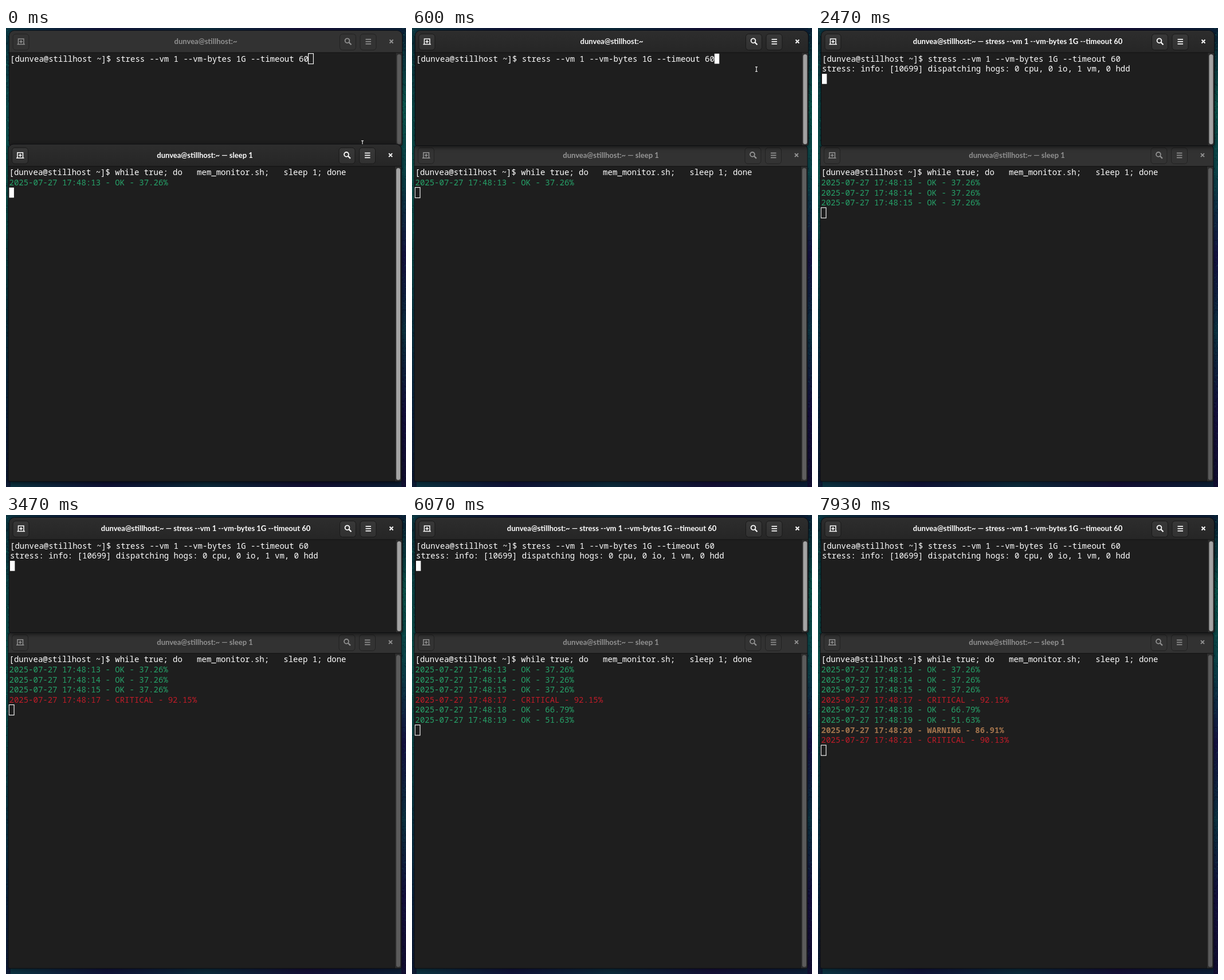
Write an HTML page with a canvas that moves like this. It is 698 px wide and 802 px high and loops after 8000 ms.

```html
<!DOCTYPE html>
<html lang="en">
<head>
<meta charset="utf-8">
<title>Memory monitor</title>
<style>
  html, body { margin: 0; width: 100%; height: 100%; overflow: hidden; background: #0b1a2c; }
  canvas { display: block; }
</style>
</head>
<body>
<canvas id="stage" width="698" height="802"></canvas>
<script>
const W = 698, H = 802, LOOP = 8000;
const CLICK = 470, ENTER = 2400;
const CELL = 8.4, ROW = 17.65, WIN_W = 686;
const MONO = '14px "Noto Sans Mono", monospace';
const TITLE = 'bold 13px Lato, sans-serif';
const GREEN = '#26a269', RED = '#c01c28', BROWN = '#a2734c', WHITE = '#ffffff';

const USER = 'dunvea@stillhost';
const PROMPT = `[${USER} ~]$ `;
const COMMAND = 'stress --vm 1 --vm-bytes 1G --timeout 60';
const BLINKS = [1070, 1670, 2400, 3070, 3470, 4070, 4800, 5470, 6070, 6670, 7270, 7930];
const LOG = [
  [0, 13, 'OK', '37.26'],
  [800, 14, 'OK', '37.26'],
  [1870, 15, 'OK', '37.26'],
  [3070, 17, 'CRITICAL', '92.15'],
  [4000, 18, 'OK', '66.79'],
  [5070, 19, 'OK', '51.63'],
  [6130, 20, 'WARNING', '86.91'],
  [7330, 21, 'CRITICAL', '90.13']
];
const LEVEL_COLOR = { OK: GREEN, CRITICAL: RED, WARNING: BROWN };

const ctx = document.getElementById('stage').getContext('2d');
const clamp = v => Math.min(1, Math.max(0, v));
const ease = v => 1 - (1 - clamp(v)) ** 3;
const lerp = (a, b, k) => a + (b - a) * k;
const gray = (a, b, k) => {
  const v = Math.round(lerp(a, b, k));
  return `rgb(${v},${v},${v})`;
};

function verticalGradient(c, y0, y1, colors) {
  const g = c.createLinearGradient(0, y0, 0, y1);
  colors.forEach((color, i) => g.addColorStop(i / (colors.length - 1), color));
  return g;
}

function makeWallpaper() {
  const canvas = document.createElement('canvas');
  canvas.width = W;
  canvas.height = H;
  const c = canvas.getContext('2d');
  c.fillStyle = verticalGradient(c, 0, H,
    ['#0b3440', '#0c4a4c', '#0d5a54', '#0c4648', '#0b3444', '#0b2440', '#0e1a34']);
  c.fillRect(0, 0, W / 2, H);
  c.fillStyle = verticalGradient(c, 0, H,
    ['#0b2036', '#0d5850', '#0b4048', '#151142', '#0c3040', '#150f3e', '#120e30']);
  c.fillRect(W / 2, 0, W / 2, H);
  const edge = c.createLinearGradient(0, 0, W, 0);
  ['#0b3440', '#101238', '#0b2a3a', '#140f36', '#0b2036'].forEach((color, i) => edge.addColorStop(i / 4, color));
  c.fillStyle = edge;
  c.fillRect(8, 0, W - 16, 12);
  c.fillRect(8, H - 12, W - 16, 12);

  let seed = 7;
  const random = () => (seed = seed * 16807 % 2147483647) / 2147483647;
  for (let i = 0; i < 700; i++) {
    const side = random() < 0.5 ? random() * 6 : W - random() * 8;
    const y = random() * H;
    const glow = 0.1 + 0.35 * random() * (1 - y / H);
    c.fillStyle = random() < 0.5 ? `rgba(30,170,130,${glow})` : 'rgba(5,8,28,0.4)';
    c.fillRect(side, y, 1.5, 1.5);
  }
  return canvas;
}
const wallpaper = makeWallpaper();

function rounded(x, y, w, h, r) {
  ctx.beginPath();
  ctx.roundRect(x, y, w, h, r);
}

function line(...points) {
  ctx.beginPath();
  points.forEach(([x, y], i) => i ? ctx.lineTo(x, y) : ctx.moveTo(x, y));
  ctx.stroke();
}

function button(x, focus) {
  rounded(x + 0.5, 6, 28, 28, 5);
  ctx.fillStyle = verticalGradient(ctx, 6, 34, [gray(51, 56, focus), gray(51, 49, focus)]);
  ctx.fill();
  ctx.lineWidth = 1;
  ctx.strokeStyle = gray(34, 25, focus);
  ctx.stroke();
}

function headerIcons(color) {
  ctx.strokeStyle = color;
  ctx.lineWidth = 1.5;
  line([14, 24], [27.5, 24]);
  line([16, 24], [16, 14.5], [25.5, 14.5], [25.5, 24]);
  line([18, 19.3], [23.5, 19.3]);
  line([20.75, 16.5], [20.75, 22]);

  ctx.lineWidth = 1.8;
  ctx.beginPath();
  ctx.arc(590, 17.7, 3.9, 0, Math.PI * 2);
  ctx.stroke();
  ctx.lineWidth = 2.2;
  line([592.8, 20.5], [597, 24.7]);

  ctx.lineWidth = 1.7;
  for (const y of [15.3, 19.3, 23.3]) line([622, y], [631.5, y]);

  ctx.lineWidth = 1.9;
  line([664, 16], [670, 22]);
  line([670, 16], [664, 22]);
}

function drawWindow(x, y, h, title, focus, drawContent) {
  ctx.save();
  ctx.translate(x, y);
  const corners = [9, 9, 3, 3];
  rounded(0, 0, WIN_W, h, corners);
  ctx.save();
  ctx.shadowColor = `rgba(0,0,0,${lerp(0.4, 0.7, focus)})`;
  ctx.shadowBlur = 9;
  ctx.shadowOffsetY = 2;
  ctx.fillStyle = '#1e1e1e';
  ctx.fill();
  ctx.restore();

  ctx.save();
  ctx.clip();
  ctx.fillStyle = verticalGradient(ctx, 0, 38, [gray(50, 45, focus), gray(50, 38, focus)]);
  ctx.fillRect(0, 0, WIN_W, 38.5);
  ctx.fillStyle = gray(56, 58, focus);
  ctx.fillRect(0, 0, WIN_W, 1);
  ctx.fillStyle = '#111111';
  ctx.fillRect(0, 38, WIN_W, 1);

  // Scrollbar
  ctx.fillStyle = '#2e2e2e';
  ctx.fillRect(674.5, 39, 12, h);
  ctx.fillStyle = '#1a1a1a';
  ctx.fillRect(674, 39, 1, h);
  rounded(677, 41.5, 7, h - 44, 3.5);
  ctx.fillStyle = gray(91, 164, focus);
  ctx.fill();
  ctx.restore();

  for (const bx of [6, 576.5, 612]) button(bx, focus);
  const ink = gray(145, 255, focus);
  headerIcons(ink);
  ctx.font = TITLE;
  ctx.textAlign = 'center';
  ctx.fillStyle = ink;
  ctx.fillText(title, 343, 23.5);

  ctx.textAlign = 'left';
  drawContent();
  rounded(0, 0, WIN_W, h, corners);
  ctx.lineWidth = 1;
  ctx.strokeStyle = 'rgba(8,10,14,0.75)';
  ctx.stroke();
  ctx.restore();
}

function termText(text, row, color = WHITE, bold = false) {
  ctx.font = (bold ? 'bold ' : '') + MONO;
  ctx.fillStyle = color;
  ctx.fillText(text, 1.5, 54 + row * ROW);
}

function termCursor(col, row, filled) {
  const x = 1.5 + col * CELL, y = 40.3 + row * ROW;
  if (filled) {
    ctx.fillStyle = WHITE;
    ctx.fillRect(x, y, CELL, ROW);
  } else {
    ctx.strokeStyle = WHITE;
    ctx.lineWidth = 1.1;
    ctx.strokeRect(x - 0.2, y - 0.2, CELL + 0.4, ROW + 0.4);
  }
}

function drawStressWindow(t, focus) {
  const title = `${USER}:~` + (t >= ENTER + 70 ? ` — ${COMMAND}` : '');
  drawWindow(5.5, 4.5, 201, title, focus, () => {
    const command = PROMPT + COMMAND;
    termText(command, 0);
    const running = t >= ENTER;
    if (running) termText('stress: info: [10699] dispatching hogs: 0 cpu, 0 io, 1 vm, 0 hdd', 1);
    // The third toggle is the return key, which leaves the cursor lit.
    const toggles = BLINKS.filter(b => b <= t).length - (running ? 1 : 0);
    if (toggles % 2 === 0) termCursor(running ? 0 : command.length, running ? 2 : 0, t >= CLICK);
  });
}

function drawMonitorWindow(t, focus) {
  drawWindow(4, 203.2, 589, `${USER}:~ — sleep 1`, focus, () => {
    termText(PROMPT + 'while true; do   mem_monitor.sh;   sleep 1; done', 0);
    const lines = LOG.filter(([at]) => at <= t);
    lines.forEach(([, second, level, percent], i) => {
      termText(`2025-07-27 17:48:${second} - ${level} - ${percent}%`, i + 1,
        LEVEL_COLOR[level], level === 'WARNING');
    });
    termCursor(0, lines.length + 1, t < CLICK);
  });
}

function drawPointer(t) {
  if (t >= 870) return;
  const up = ease((t - 40) / 500), out = clamp((t - 610) / 260) ** 2;
  const x = lerp(622, 601, up) + 108 * out;
  const y = lerp(201, 72, up) + 8 * out;
  ctx.save();
  if (t < 70) {
    ctx.beginPath();
    ctx.rect(0, 0, W, 203);
    ctx.clip();
  }
  for (const [color, width] of [['#000000', 2.8], ['#ffffff', 1.2]]) {
    ctx.strokeStyle = color;
    ctx.lineWidth = width;
    line([x - 2, y - 4], [x + 2, y - 4]);
    line([x, y - 4], [x, y + 4]);
    line([x - 2, y + 4], [x + 2, y + 4]);
  }
  ctx.restore();
}

function render(t) {
  ctx.drawImage(wallpaper, 0, 0);
  const focus = ease((t - CLICK) / 200);
  if (t < CLICK) {
    drawStressWindow(t, focus);
    drawMonitorWindow(t, 1 - focus);
  } else {
    drawMonitorWindow(t, 1 - focus);
    drawStressWindow(t, focus);
  }
  drawPointer(t);
}

const start = performance.now();
function tick() {
  render((performance.now() - start) % LOOP);
  requestAnimationFrame(tick);
}
tick();
</script>
</body>
</html>
```
